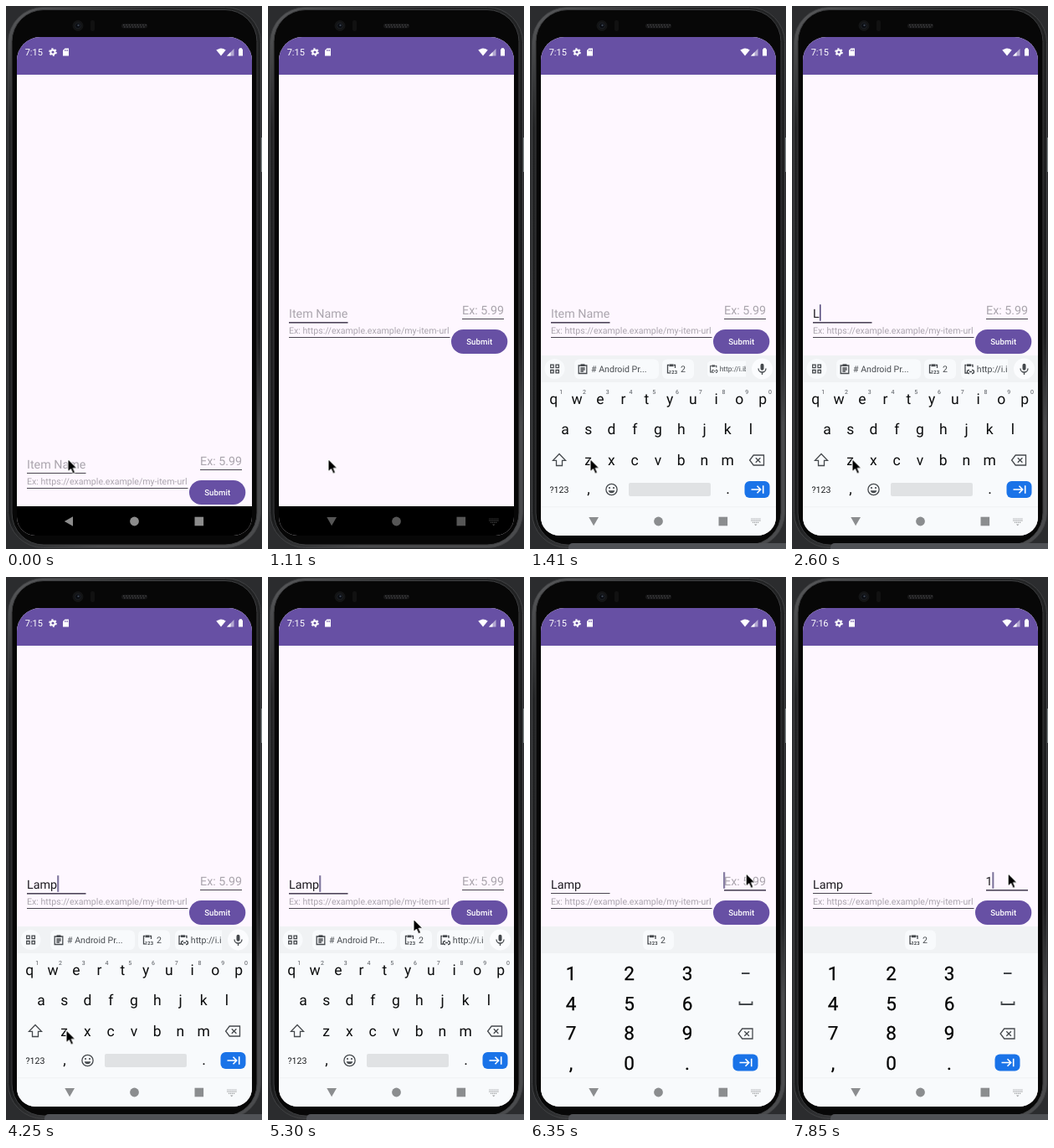
These frames come from a looping animation (306x648 px, 8 s). An HTML page:

```html
<!DOCTYPE html>
<html lang="en">
<head>
<meta charset="utf-8">
<title>Item form</title>
<style>
html, body { margin: 0; width: 100%; height: 100%; overflow: hidden; background: #2b2c2e; }
svg { display: block; width: 306px; height: 648px; font-family: Roboto, sans-serif; text-rendering: geometricPrecision; }
.hint { fill: #aaa5ad; }
.field { font-size: 14.3px; }
.typed { fill: #1d1b20; }
.mid { text-anchor: middle; }
.key { font-size: 17.5px; fill: #0c0d0e; }
.sup { font-size: 7px; fill: #50545a; }
.digit { font-size: 22.5px; fill: #000; stroke: #000; stroke-width: .25; }
.chip { font-size: 10.6px; fill: #484c50; }
.line { fill: none; stroke: #45494d; stroke-width: 1.3; }
.bold { stroke-width: 1.8; }
</style>
</head>
<body>
<svg viewBox="0 0 306 648">
  <defs>
    <clipPath id="screen"><path d="M13 65a28 28 0 0 1 28-28H266a28 28 0 0 1 28 28V610a22 22 0 0 1-22 22H35a22 22 0 0 1-22-22Z"/></clipPath>
    <clipPath id="strip"><rect x="200" y="417" width="58" height="32"/></clipPath>
    <linearGradient id="rim" x2=".35" y2="1">
      <stop offset="0" stop-color="#5c5d5f"/><stop offset=".2" stop-color="#232425"/>
      <stop offset=".85" stop-color="#1c1d1e"/><stop offset="1" stop-color="#4a4b4d"/>
    </linearGradient>
    <g id="paste" class="line">
      <path d="M3-4.5H4.5V-1M-3-4.5H-4.5V4.8H-2"/>
      <path d="M-2.6-5.6H2.6V-2.8H-2.6Z" fill="#45494d" stroke="none"/>
      <text x="2" y="5.6" font-size="5.8" font-weight="700" class="mid" fill="#45494d" stroke="none">123</text>
    </g>
    <path id="erase" class="line" d="M-3.8-6H8.5V6H-3.8L-8.4 0ZM-1.2-2.8 4.4 2.8M4.4-2.8-1.2 2.8"/>
    <g id="next">
      <rect x="-15" y="-10" width="30" height="20" rx="6" fill="#1a73e8"/>
      <path d="M-7 0H4M0-4.2 4.2 0 0 4.2M7.2-4.8V4.8" fill="none" stroke="#fff" stroke-width="1.6"/>
    </g>
  </defs>

  <!-- phone body -->
  <rect width="306" height="648" fill="#2b2c2e"/>
  <rect x="305" y="157" width="1" height="41" fill="#7b8283"/>
  <rect x="2.5" y="1.5" width="302" height="645" rx="42" fill="url(#rim)" stroke="#404143"/>
  <rect x="7" y="4.5" width="293" height="638.5" rx="38" fill="#070707" stroke="#3c3d3f"/>
  <circle cx="86" cy="23.5" r="6.5" fill="#131415"/>
  <circle cx="86" cy="23.5" r="3.4" fill="#0a0c11" stroke="#1d2025"/>
  <circle cx="86.5" cy="23" r="1.2" fill="#39424f"/>
  <rect x="101" y="17" width="5" height="13" rx="2" fill="#111"/>
  <rect x="138" y="21" width="31" height="5.5" rx="2.7" fill="#171718"/>
  <path d="M140 22.7H168M141 25H167" stroke="#505153" stroke-width="1.1" stroke-dasharray="1.5 1.8"/>
  <path id="dock" d="M46 648V646a5 5 0 0 1 5-5H306V648Z" fill="#505256"/>

  <g clip-path="url(#screen)">
    <rect x="13" y="37" width="281" height="595" fill="#fef7ff"/>
    <rect x="13" y="37" width="281" height="45" fill="#6750a4"/>

    <!-- status bar -->
    <g fill="#fff">
      <text x="22.7" y="59" font-size="11">7:1<tspan id="min5">5</tspan></text>
      <text id="min6" x="37.2" y="59" font-size="11">6</text>
      <circle cx="56" cy="55" r="2.6" fill="none" stroke="#fff" stroke-width="2"/>
      <circle cx="56" cy="55" r="4.1" fill="none" stroke="#fff" stroke-width="1.5" stroke-dasharray="2.1 2.193"/>
      <path d="M70.5 50.5H75V59.5H68V53Z"/>
      <path d="M70.6 52V54M72.1 52V54M73.6 52V54" stroke="#6750a4" stroke-width=".7"/>
      <path d="M257 59.5 251.3 52.6Q257 48.6 262.7 52.6Z"/>
      <path d="M264 59.5H272.5V51Z" opacity=".5"/><path d="M264 59.5H268.5V55Z"/>
      <path d="M279 50.3H282V51.4H283V59.6H278V51.4H279Z"/>
    </g>

    <!-- form -->
    <g id="form">
      <text id="nameHint" class="hint field" x="25" y="372">Item Name</text>
      <text id="name" class="typed field" x="25" y="372"></text>
      <rect id="nameLine" x="25" y="377" width="70.5" height="1"/>
      <text id="priceHint" class="hint field" x="232" y="368">Ex: 5.99</text>
      <text id="price" class="typed field" x="231.6" y="368">1</text>
      <rect id="priceLine" x="232" y="373" width="50" height="1"/>
      <text class="hint" x="25" y="390.7" font-size="10.62">Ex: https://example.example/my-item-url</text>
      <rect x="25" y="395" width="192.5" height="1" fill="#49454f"/>
      <rect x="219" y="386" width="67.3" height="29" rx="14.5" fill="#6750a4"/>
      <text class="mid" x="252.8" y="404" font-size="9.7" font-weight="500" letter-spacing=".07" fill="#fff">Submit</text>
      <rect id="caret" y="356.2" width="1.5" height="19.6" fill="#4f4578"/>
    </g>

    <rect x="13" y="597" width="281" height="35"/>

    <!-- keyboards -->
    <g id="board">
      <rect x="13" y="417" width="281" height="215" fill="#f8fafc"/>
      <rect x="13" y="417" width="281" height="32" fill="#f0f2f4"/>
      <g id="letters">
        <circle cx="29.5" cy="433" r="12" fill="#f8fafc"/>
        <path class="line" d="M24.7 428.2h3.4v3.4h-3.4ZM31 428.2h3.4v3.4H31ZM24.7 434.5h3.4v3.4h-3.4ZM31 434.5h3.4v3.4H31Z"/>
        <g fill="#f8fafc">
          <rect x="53" y="421.5" width="101" height="23.5" rx="6"/>
          <rect x="158" y="421.5" width="38" height="23.5" rx="6"/>
        </g>
        <path class="line" d="M58.2 429H67.8V438.5H58.2ZM60.3 432H65.7M60.3 434H65.7M60.3 436H64"/>
        <rect x="60.5" y="427.3" width="5" height="2.7" fill="#45494d"/>
        <text class="chip" x="73" y="437"># Android Pr...</text>
        <use href="#paste" x="169" y="433"/>
        <text class="chip" x="180" y="437">2</text>
        <g clip-path="url(#strip)"><g id="link">
          <rect x="202" y="421.5" width="70" height="23.5" rx="6" fill="#f8fafc"/>
          <path class="line" d="M214.5 428.5H216V431M208.5 428.5H207V438H209.5M212 434.5h-.5a2 2 0 0 0 0 4h.5M215 434.5h.5a2 2 0 0 1 0 4h-.5M212 436.5H215"/>
          <rect x="209" y="427.3" width="5" height="2.7" fill="#45494d"/>
          <text class="chip" x="220.8" y="437">http://i.ibb</text>
        </g></g>
        <circle cx="277.5" cy="433" r="12.5" fill="#fbfcfe"/>
        <rect x="275.5" y="426.8" width="4" height="8" rx="2" fill="#45494d"/>
        <path class="line" d="M273 432.5a4.5 4.5 0 0 0 9 0M277.5 437V440"/>
        <g id="keys"></g>
        <path class="line" d="M35 534.5 42.5 542.3H38.5V548.5H31.5V542.3H27.5Z"/>
        <use href="#erase" x="271" y="542"/>
        <text class="mid" x="35" y="580.7" font-size="10.6" fill="#1c1e20">?123</text>
        <circle class="line" cx="97.5" cy="577" r="6.6"/>
        <path d="M93.7 578.3h7.6a3.9 3.9 0 0 1-7.6 0Z" fill="#45494d"/>
        <circle cx="95" cy="575" r="1.1" fill="#45494d"/><circle cx="100" cy="575" r="1.1" fill="#45494d"/>
        <rect x="118" y="569" width="98" height="16" rx="2" fill="#e0e2e4"/>
        <use href="#next" x="271.5" y="577"/>
      </g>
      <g id="numbers">
        <rect x="13" y="417" width="281" height="215" fill="#f8fafc"/>
        <rect x="13" y="417" width="281" height="32" fill="#f0f2f4"/>
        <rect x="135" y="421.5" width="37" height="23.5" rx="6" fill="#f8fafc"/>
        <use href="#paste" x="145.5" y="433"/>
        <text class="chip" x="156" y="437">2</text>
        <g id="pad"></g>
        <path class="line bold" d="M253 473H262.5M250.5 506.5V510H265.5V506.5"/>
        <use href="#erase" x="257.5" y="545"/>
        <use href="#next" x="257.5" y="579.5"/>
      </g>
      <rect x="13" y="597.5" width="281" height=".7" fill="#eceef0"/>
    </g>

    <!-- navigation -->
    <g id="nav">
      <path id="back" d="M69.8 615 80 609.3V620.7Z"/>
      <path id="down" d="M70.3 610H82L76.1 620.3Z"/>
      <circle cx="153.5" cy="615" r="5.4"/>
      <rect x="225.5" y="609.7" width="10.6" height="10.6"/>
      <g id="ime">
        <path d="M264.3 612H275.5M264.3 614.2H275.5M266 616.4H274" stroke="currentColor" stroke-width="1.2" stroke-dasharray="1.2 .8"/>
        <path d="M268 618.5H271.5L269.7 620.3Z" fill="currentColor"/>
      </g>
    </g>
  </g>

  <path id="pointer" d="M.5.5V15.4L4 12.2 6.5 17.7 9.1 16.6 6.7 11.2H11.2Z" stroke="#fff"/>
</svg>
<script>
const LOOP = 8000;
const $ = id => document.getElementById(id);
const sheet = document.head.appendChild(document.createElement('style'));
const tracks = {};

// Stepped keyframes for one property; the keys are milliseconds.
function track(id, prop, values) {
  const frames = Object.entries(values).map(([ms, v]) => `${ms / LOOP * 100}% { ${prop}: ${v} }`);
  const last = Object.values(values).pop();
  const name = `${id}-${prop}`;
  sheet.textContent += `@keyframes ${name} { ${frames.join(' ')} 100% { ${prop}: ${last} } }\n`;
  (tracks[id] ||= []).push(`${name} ${LOOP}ms step-end infinite`);
}
const show = (id, ms) => track(id, 'opacity', { 0: 0, [ms]: 1 });
const hide = (id, ms) => track(id, 'opacity', { 0: 1, [ms]: 0 });
const move = (x, y) => `translate(${x}px, ${y}px)`;

const label = (cls, x, y, s) => `<text class="${cls} mid" x="${x}" y="${y}">${s}</text>`;
const row = (s, x, y) => [...s].map((c, i) => label('key', x + i * 27.75, y, c)).join('');
$('keys').innerHTML = row('qwertyuiop', 28.3, 475) + row('asdfghjkl', 42, 511) + row('zxcvbnm', 69.7, 547.5)
  + [...'1234567890'].map((c, i) => label('sup', 37.2 + i * 27.75, 462.5, c)).join('')
  + label('key', 70, 582, ',') + label('key', 236.5, 582, '.');
$('pad').innerHTML = ['123', '456', '789', ',0.'].map((line, r) =>
  [...line].map((c, i) => label('digit', 49 + i * 69.5, 481 + r * 35.7, c)).join('')).join('');
$('name').innerHTML = [...'Lamp'].map((c, i) => `<tspan id="ch${i}">${c}</tspan>`).join('');

track('form', 'transform', { 0: move(0, 180), 960: move(0, 0) });
hide('nameHint', 2600);
[2600, 3050, 3500, 4250].forEach((ms, i) => track('ch' + i, 'fill-opacity', { 0: 0, [ms]: 1 }));
hide('priceHint', 7700);
show('price', 7700);
track('min5', 'fill-opacity', { 0: 1, 7400: 0 });
show('min6', 7400);

const idle = '#49454f', focus = '#4d4559';
track('nameLine', 'fill', { 0: idle, 660: focus, 6200: idle });
track('nameLine', 'height', { 0: '1px', 660: '1.6px', 6200: '1px' });
track('priceLine', 'fill', { 0: idle, 6200: focus });
track('priceLine', 'height', { 0: '1px', 6200: '1.6px' });

track('caret', 'transform', {
  0: move(25.2, 0), 2600: move(33, 0), 3050: move(40.5, 0), 3500: move(53.3, 0),
  4250: move(61.4, 0), 6200: move(231.3, -4), 7700: move(239.5, -4)
});
track('caret', 'opacity', {
  0: 0, 660: 1, 960: 0, 1560: 1, 2010: 0, 2600: 1, 3800: 0, 4250: 1,
  4700: 0, 5300: 1, 5750: 0, 6200: 1, 6650: 0, 7250: 1
});

track('board', 'transform', { 0: move(0, 231), 1260: move(0, 60), 1410: move(0, 0) });
track('link', 'transform', { 0: 'translate(50px, 86.6px) scale(.8)', 1560: 'none' });
show('numbers', 6350);
hide('letters', 6350);
show('dock', 1260);

hide('back', 960);
show('down', 960);
show('ime', 960);
track('nav', 'fill', { 0: '#8c8c8c', 960: '#565656', 1410: '#8b8d8f' });
track('nav', 'color', { 0: '#444', 1410: '#9a9c9e' });

track('pointer', 'transform', {
  0: move(73.5, 540.3), 660: move(71.5, 540.3), 4850: move(78, 534), 5000: move(106, 504),
  5150: move(142, 455), 5300: move(173.5, 408), 5450: move(208, 380), 5600: move(236, 361),
  5750: move(252, 356), 5900: move(257.7, 353.5)
});

for (const id in tracks) sheet.textContent += `#${id} { animation: ${tracks[id].join(', ')} }\n`;
</script>
</body>
</html>
```
